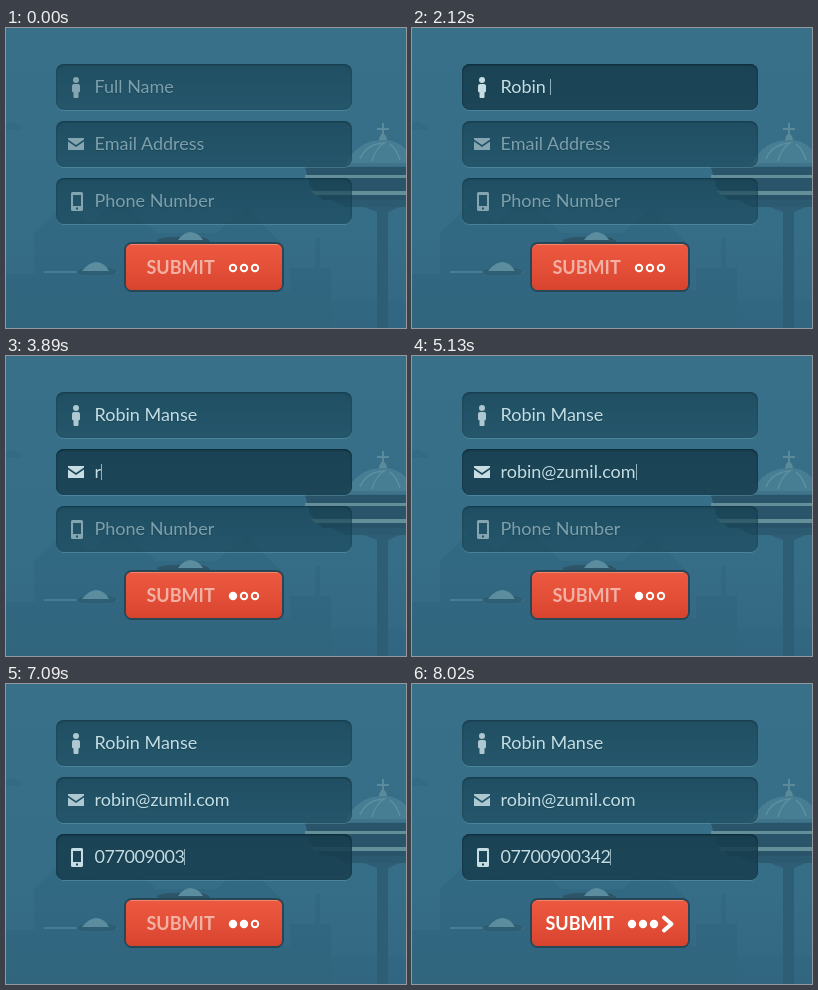
Recreate the animation shown at these times as an HTML page. Size 400 px wide and 300 px high, loop 9020 ms.

```html
<!DOCTYPE html>
<html lang="en">
<head>
<meta charset="utf-8">
<title>Sign-up form</title>
<style>
  html, body { margin: 0; width: 100%; height: 100%; overflow: hidden; background: #366e88; }
  #stage { position: relative; width: 400px; height: 300px; overflow: hidden; }
  #stage > svg { position: absolute; left: 0; top: 0; display: block; }
  .field {
    position: absolute; left: 50px; width: 296px; height: 46px; border-radius: 8px;
    background: linear-gradient(rgba(20, 62, 79, .66), rgba(23, 68, 85, .58));
    box-shadow: inset 0 1px 2px rgba(10, 40, 54, .6), 0 1px 0 rgba(125, 185, 205, .3);
  }
  .focus {
    position: absolute; inset: 0; border-radius: 8px; opacity: 0;
    background: rgba(23, 60, 77, .62);
    box-shadow: inset 0 1px 2px rgba(8, 32, 44, .6);
  }
  .hint, .value {
    position: absolute; left: 38.5px; top: 0; line-height: 45px; white-space: pre;
    font-family: Lato, "Open Sans", sans-serif; font-size: 18px;
    text-shadow: 0 1px 1px rgba(8, 40, 54, .3);
  }
  .hint { color: #7d9fac; }
  .value { color: #c4dde3; }
  .phone .value { letter-spacing: -.45px; }
  .caret {
    display: inline-block; width: 1px; height: 16px; vertical-align: -2px;
    background: #8fb0bb; opacity: 0;
  }
  .label { font: 700 18px Lato, "Open Sans", sans-serif; }
</style>
</head>
<body>
<div id="stage">
  <svg width="400" height="300" viewBox="0 0 400 300">
    <defs>
      <linearGradient id="sky" x1="0" y1="0" x2="0" y2="1">
        <stop offset="0" stop-color="#387089"/>
        <stop offset=".6" stop-color="#366e88"/>
        <stop offset="1" stop-color="#346882"/>
      </linearGradient>
    </defs>
    <rect width="400" height="300" fill="url(#sky)"/>

    <!-- skyline -->
    <g fill="#2c6079" opacity=".3">
      <path d="M0 102V96q5-5 10 0q6 1 6 6z"/>
      <path d="M28 300V205L62 172L84 196L112 168L150 205H210L240 180L275 215V300z"/>
      <path d="M0 300V246H50V262H96V246H140V300z"/>
      <path d="M252 300V262H284V240H325V300z"/>
      <rect x="309" y="210" width="5" height="32"/>
      <rect x="0" y="272" width="400" height="28" opacity=".5"/>
    </g>
    <!-- small craft -->
    <g>
      <rect x="38" y="243" width="74" height="2" fill="#467d92"/>
      <path d="M70 244q5-4 12-4h20q6 1 10 4l-8 3H76z" fill="#2d5e74"/>
      <path d="M76 243q7-9 15-9q8 1 12 9z" fill="#5b8d9e"/>
      <path d="M150 212q8-3 18-3h28q5 1 8 4v3H156z" fill="#2d5467"/>
      <path d="M172 212q6-8 13-8q8 1 12 8z" fill="#5b8d9e"/>
    </g>
    <!-- tower -->
    <g>
      <path d="M376 95h2v5h5v2h-5v4q3 2 3 7h-8q0-5 3-7v-4h-5v-2h5z" fill="#5b8b9b"/>
      <path d="M340 137Q350 112 378 112Q394 112 406 128V137z" fill="#477e94"/>
      <path d="M354 131Q360 116 378 115Q369 121 366 133M384 116Q391 122 394 132" fill="none" stroke="#5d909f" stroke-width="1.5"/>
      <rect x="338" y="135" width="62" height="3" fill="#3f748a"/>
      <path d="M299 139H400V172H316L304 158z" fill="#2a5469"/>
      <path d="M299 147H400V150H299zM305 163H400V167H309z" fill="#648f98"/>
      <path d="M326 172H400V179H340z" fill="#2c5b71"/>
      <path d="M358 179H394L382 184V300H371V184z" fill="#2d5e76"/>
    </g>
  </svg>

  <div class="field" style="top:36px">
    <div class="focus"></div><div class="hint">Full Name</div>
    <div class="value"><span></span><i class="caret"></i></div>
  </div>
  <div class="field" style="top:93px">
    <div class="focus"></div><div class="hint">Email Address</div>
    <div class="value"><span></span><i class="caret"></i></div>
  </div>
  <div class="field phone" style="top:150px">
    <div class="focus"></div><div class="hint">Phone Number</div>
    <div class="value"><span></span><i class="caret"></i></div>
  </div>

  <svg width="400" height="300" viewBox="0 0 400 300">
    <defs>
      <linearGradient id="red" x1="0" y1="0" x2="0" y2="1">
        <stop offset="0" stop-color="#ec5a41"/>
        <stop offset=".5" stop-color="#e44f37"/>
        <stop offset="1" stop-color="#d7442e"/>
      </linearGradient>
    </defs>
    <g fill="#c6dde3">
      <g class="icon">
        <circle cx="70" cy="52" r="3"/>
        <path d="M68 56h4q2 0 2 2v5q0 1-1.5 1.5V69q0 1-1 1h-3q-1 0-1-1v-4.500Q66 64 66 63v-5q0-2 2-2z"/>
      </g>
      <g class="icon">
        <path d="M62 110H78V111.500L70 117L62 111.500zM62 113.500L70 119L78 113.500V122H62z"/>
      </g>
      <path class="icon" fill-rule="evenodd" d="M66.500 164h9q1.500 0 1.500 1.500v16q0 1.500-1.500 1.500h-9q-1.500 0-1.500-1.500v-16q0-1.500 1.500-1.500zM67 167v11h8v-11zM70 179.500v2h2v-2z"/>
    </g>

    <rect x="118" y="214" width="160" height="50" rx="8" fill="#274757"/>
    <rect x="120" y="216" width="156" height="46" rx="5.500" fill="url(#red)"/>
    <path d="M125 216.500H271" stroke="#f5836b" stroke-linecap="round"/>
    <g id="face" fill="#fff">
      <text id="submit" class="label" x="140.500" y="246">SUBMIT</text>
      <g stroke="#fff" stroke-width="2">
        <circle class="dot" cx="227" cy="240" r="3.200"/>
        <circle class="dot" cx="238" cy="240" r="3.200"/>
        <circle class="dot" cx="249" cy="240" r="3.200"/>
      </g>
      <path id="arrow" d="M259 233.500L266.500 240L259 246.500" fill="none" stroke="#fff" stroke-width="4" stroke-linecap="round" stroke-linejoin="round"/>
    </g>
  </svg>
</div>
<script>
  const LOOP = 9020, KEY = 70;
  const all = s => [...document.querySelectorAll(s)];
  const icons = all('.icon'), dots = all('.dot');
  const face = document.getElementById('face');
  const submit = document.getElementById('submit');
  const arrow = document.getElementById('arrow');

  // bursts: [time of first key, number of keys]
  const fields = [
    { text: 'Robin Manse', on: 1000, off: 3090, bursts: [[1700, 4], [2050, 2], [2240, 2], [2450, 3]] },
    { text: 'robin@zumil.com', on: 3090, off: 5630, bursts: [[3890, 2], [4110, 4], [4440, 5], [4920, 4]] },
    { text: '07700900342', on: 5630, off: Infinity, bursts: [[6330, 4], [6740, 4], [7090, 3]] }
  ];
  all('.field').forEach((el, i) => {
    const part = s => el.querySelector(s);
    Object.assign(fields[i], {
      focus: part('.focus'), hint: part('.hint'), typed: part('span'), caret: part('.caret')
    });
  });

  // number of steps taken since a start time, the first one at once
  const steps = (t, start, gap, max) =>
    Math.max(0, Math.min(max, Math.floor((t - start) / gap) + 1));
  const fade = (t, start) => steps(t, start, 50, 5) / 5;

  function draw(t) {
    fields.forEach((f, i) => {
      const on = fade(t, f.on), off = fade(t, f.off);
      const keys = f.bursts.reduce((sum, [start, n]) => sum + steps(t, start, KEY, n), 0);
      f.focus.style.opacity = f.caret.style.opacity = on - off;
      f.hint.style.opacity = 1 - on;
      f.typed.textContent = f.text.slice(0, keys);
      icons[i].style.opacity = .6 + .4 * on - .15 * off;
    });
    const done = steps(t, 7730, 58, 6) / 6;
    dots[0].style.fillOpacity = fade(t, 3090);
    dots[1].style.fillOpacity = fade(t, 5630);
    dots[2].style.fillOpacity = done;
    face.setAttribute('transform', `translate(${-7 * done} 0)`);
    submit.style.opacity = .55 + .45 * done;
    arrow.style.opacity = done;
  }

  const begin = performance.now();
  function tick() {
    draw((performance.now() - begin) % LOOP);
    requestAnimationFrame(tick);
  }
  tick();
</script>
</body>
</html>
```
